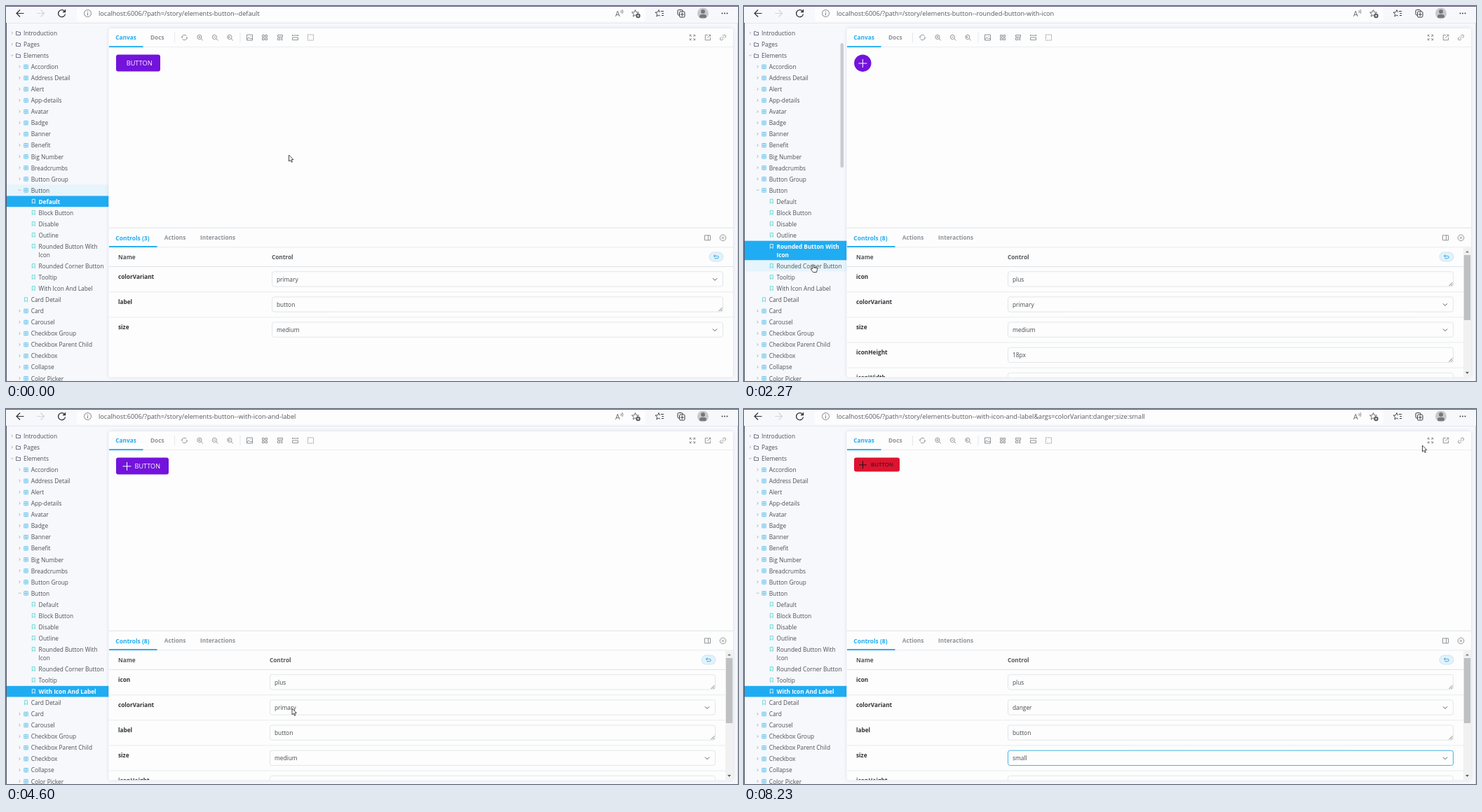
An HTML page with a canvas that plays this animation: 1044 by 536 pixels, repeating every 8.26 s.

```html
<!DOCTYPE html>
<html lang="en">
<head>
<meta charset="utf-8">
<title>Component explorer</title>
<style>
html, body { margin: 0; width: 100%; height: 100%; overflow: hidden; background: #f6f8fc; }
canvas { display: block; }
</style>
</head>
<body>
<canvas id="stage" width="1044" height="536"></canvas>
<script>
const g = document.getElementById('stage').getContext('2d');
const LOOP = 8260, BLUE = '#20acf2', PURPLE = '#7313dc', GREY = '#8f9398', INK = '#45484c';

// ---- drawing helpers ----
function text(s, x, y, color = INK, size = 8.33, weight = 400, align = 'left') {
  g.font = `${weight} ${size}px "Open Sans", "Noto Sans", sans-serif`;
  g.fillStyle = color;
  g.textAlign = align;
  g.fillText(s, x, y + size * 0.36);
}
const bold = (s, x, y, color = '#303336', size = 8.25) => text(s, x, y, color, size, 700);

function rect(x, y, w, h, fill) {
  g.fillStyle = fill;
  g.fillRect(x, y, w, h);
}

function box(x, y, w, h, r, fill, stroke, line = 1) {
  g.beginPath();
  g.roundRect(x, y, w, h, r);
  if (fill) { g.fillStyle = fill; g.fill(); }
  if (stroke) { g.strokeStyle = stroke; g.lineWidth = line; g.stroke(); }
}

const disc = (x, y, r, fill, stroke, line) => box(x - r, y - r, 2 * r, 2 * r, r, fill, stroke, line);

// Strokes (or fills) a path given around its own centre.
function icon(x, y, d, color, line = 0.9, fill) {
  g.save();
  g.translate(x, y);
  const p = new Path2D(d);
  if (fill) { g.fillStyle = fill; g.fill(p); }
  g.strokeStyle = color;
  g.lineWidth = line;
  g.stroke(p);
  g.restore();
}

const I = {
  back: 'M5.5 0H-5M0 -5L-5 0L0 5',
  forward: 'M-5.5 0H5M0 -5L5 0L0 5',
  reload: 'M4.6 -2A5 5 0 1 0 5 1M5 -5.5V-2H1.5',
  star: 'M0 -5L1.4 -1.7L5 -1.4L2.3 .9L3.1 4.4L0 2.5L-3.1 4.4L-2.3 .9L-5 -1.4L-1.4 -1.7Z',
  lines: 'M2 -3H6M3.5 0H6M3 3H6',
  plus: 'M-2.5 0H2.5M0 -2.5V2.5',
  arrow: 'M-1 -1.6L.8 0L-1 1.6',
  open: 'M-1.6 -.8L0 .9L1.6 -.8',
  folder: 'M-3 -2.5H-.6L.2 -1.5H3V2.5H-3Z',
  grid: 'M-2.7 -2.7H2.7V2.7H-2.7ZM0 -2.7V2.7M-2.7 0H2.7',
  mark: 'M-2 -3H2V3L0 1.3L-2 3Z',
  sync: 'M-3.6 -.6A3.7 3.7 0 0 1 3 -2.2M3.6 .6A3.7 3.7 0 0 1 -3 2.2M-4.6 -1.2L-3.6 .4L-2.2 -.8M4.6 1.2L3.6 -.4L2.2 .8',
  lens: 'M2.5 -.6A3.1 3.1 0 1 1 -3.7 -.6A3.1 3.1 0 1 1 2.5 -.6M1.6 1.7L4.3 4.3',
  image: 'M-4 -4H4V4H-4ZM-4 3L-1.5 0L1 2L2.2 .8L4 3M1 -1.5H2',
  cells: 'M-3.5 -3.5H-.8V-.8H-3.5ZM.8 -3.5H3.5V-.8H.8ZM-3.5 .8H-.8V3.5H-3.5ZM.8 .8H3.5V3.5H.8Z',
  panes: 'M-3.5 -3.5H3.5V-1H-3.5ZM-3.5 .7H-.3V3.5H-3.5ZM1.2 .7H3.5M1.2 2H3.5M1.2 3.5H3.5',
  ruler: 'M-4 -3H4M-4 -4V-2M4 -4V-2M-4 0H4V3.5H-4Z',
  frame: 'M-4 -4H4V4H-4Z',
  expand: 'M-1 -1L-3.7 -3.7M1 -1L3.7 -3.7M-1 1L-3.7 3.7M1 1L3.7 3.7M-3.7 -1.3V-3.7H-1.3M1.3 -3.7H3.7V-1.3M-3.7 1.3V3.7H-1.3M1.3 3.7H3.7V1.3',
  leave: 'M0 -3.5H-3.7V3.7H3.5V0M-.8 .8L3.8 -3.8M1.2 -3.8H3.8V-1.2',
  link: 'M-.6 -2L1 -3.5A2 2 0 0 1 3.8 -.8L2.2 .8M.6 2L-1 3.5A2 2 0 0 1 -3.8 .8L-2.2 -.8M-1.5 1.5L1.5 -1.5',
  side: 'M-4 -3.5H4V3.5H-4ZM1 -3.5V3.5',
  cross: 'M-1.7 -1.7L1.7 1.7M1.7 -1.7L-1.7 1.7',
  undo: 'M-3.5 -1H1.5A1.7 1.7 0 0 1 1.5 2.5H-2.5M-1.6 -3L-3.6 -1L-1.6 1',
  chevron: 'M-3 -1.5L0 1.5L3 -1.5',
  grip: 'M-2.5 2.5L2.5 -2.5M.3 2.5L2.5 .3',
  pointer: 'M0 0V9L2.1 7.2L3.6 10.4L5 9.7L3.6 6.7L6.3 6.5Z',
  hand: 'M-1 1Q0 -.6 1 1V4.2L5 5Q6.5 5.4 6 7.5L5 11.5H0L-3.2 7.3Q-3.4 5.6 -1 7Z'
};

// ---- sidebar ----
const tree = [];
let rowY = 39;
function addRows(kind, names) {
  for (const name of names.split(',')) {
    const lines = name.split('|'), h = lines.length > 1 ? 28.1 : 16.05;
    tree.push({ kind, lines, y: rowY, h });
    rowY += h;
  }
}
addRows('folder', 'Introduction,Pages,Elements');
addRows('grid', 'Accordion,Address Detail,Alert,App-details,Avatar,Badge,Banner,Benefit,Big Number,Breadcrumbs,Button Group,Button');
addRows('story', 'Default,Block Button,Disable,Outline,Rounded Button With|Icon,Rounded Corner Button,Tooltip,With Icon And Label');
addRows('mark', 'Card Detail');
addRows('grid', 'Card,Carousel,Checkbox Group,Checkbox Parent Child,Checkbox,Collapse,Color Picker');
const FIRST = 15;

function sidebar(selected, cur) {
  const inside = cur.x < 146;
  tree.forEach((row, i) => {
    const { kind, lines, y, h } = row, on = i === FIRST + selected;
    const top = y - 8.3;
    const hover = inside ? cur.y >= top && cur.y < top + h + 0.4 && cur.y - top > 0.8
                         : lines[0] === 'Button' && selected === 0;
    if (on) rect(1, top, 145.5, h - 0.4, BLUE);
    else if (hover) rect(1, top, 145.5, h - 0.4, '#e6f4fc');
    const expanded = lines[0] === 'Elements' || lines[0] === 'Button';
    const indent = { folder: 25, grid: 35.7, mark: 35.7, story: 46.5 }[kind];
    if (kind === 'folder') icon(17.5, y, I.folder, '#50506c', 0.8);
    else if (kind === 'grid') icon(28.5, y - 0.3, I.grid, '#4dbbe8', 0.8);
    else icon(indent - 7.2, y - 0.5, I.mark, on ? '#fff' : '#48d5cf', 0.8);
    if (kind === 'folder' || kind === 'grid')
      icon(indent - 16.2, y - 0.5, expanded ? I.open : I.arrow, '#9a9fa5', 0.8);
    lines.forEach((s, k) => text(s, indent, y + k * 12.1, on ? '#fff' : '#4c5054', on ? 8.25 : 8.33, on ? 700 : 400));
  });
  if (inside) box(137.5, 53, 4.5, 178, 2.2, '#c9cbd0');
}

// ---- stories: url slug, number of controls, "kind name value" rows ----
const common = ['s colorVariant primary', 't label button', 's size medium'];
const stories = [
  { slug: 'default', count: 3, rows: common },
  { slug: 'block-button', count: 4, rows: ['s colorVariant primary', 's size medium', 'b block true', 't label Block'] },
  { slug: 'disable', count: 4, rows: [...common, 'b disabled true'] },
  { slug: 'outline', count: 4, rows: [...common, 'b outline true'] },
  { slug: 'rounded-button-with-icon', count: 8, thumb: 93,
    rows: ['t icon plus', 's colorVariant primary', 's size medium', 't iconHeight 18px', 't iconWidth 18px'] },
  { slug: 'rounded-corner-button', count: 4, rows: [...common, 'b rounded true'] },
  { slug: 'tooltip', count: 5, thumb: 118, rows: [...common, 'r tooltipPlacement right'] },
  { slug: 'with-icon-and-label', count: 8, thumb: 93, rows: ['t icon plus', ...common, 't iconHeight 18px'] }
];

const steps = [
  [0, 0], [720, 1], [1130, 2], [1530, 3], [1930, 4], [2400, 5], [2950, 6], [3630, 7],
  [5100, 7, { colorVariant: 'success' }],
  [6200, 7, { colorVariant: 'danger' }],
  [6900, 7, { colorVariant: 'danger', size: 'large' }],
  [7550, 7, { colorVariant: 'danger', size: 'small' }]
];
function stateAt(t) {
  const [, id, args = {}] = steps.filter(s => s[0] <= Math.max(t, 0)).pop();
  return { id, args, story: stories[id] };
}

// ---- browser bar ----
function browserBar({ story, args }) {
  rect(0, 0, 1044, 24, '#f7f8fc');
  box(101, -4, 811, 26, 4, '#fdfdfe');
  rect(0, 24, 1044, 1, '#e6e8ee');
  icon(20, 10.5, I.back, '#303036', 1.2);
  icon(49.5, 10.5, I.forward, '#d3d5da', 1.2);
  icon(79.5, 10.5, I.reload, '#303036', 1.3);
  disc(116.5, 10.5, 5, null, '#75777c', 0.9);
  rect(116, 9.8, 1, 3.6, '#75777c');
  rect(116, 7.7, 1, 1.1, '#75777c');
  const list = Object.entries(args).map(e => e.join(':')).join(';');
  text(`localhost:6006/?path=/story/elements-button--${story.slug}${list && '&args=' + list}`, 132, 10.5, '#55585d', 9.19);
  text('A', 869, 11, '#66696e', 10.5);
  icon(877, 8, 'M0 -2Q1.2 0 0 2M2 -3Q3.8 0 2 3', '#66696e', 0.8);
  icon(897.5, 10.5, I.star, '#55585d');
  disc(901.5, 14, 3.2, '#55585d');
  icon(901.5, 14, 'M-1.7 0H1.7M0 -1.7V1.7', '#fff', 0.8);
  icon(931, 10.5, I.star, '#34363a');
  rect(933, 7, 5, 8, '#f7f8fc');
  icon(932, 10.5, I.lines, '#34363a', 1);
  box(958, 5.5, 7, 7.5, 1.5, null, '#34363a');
  box(960.5, 8, 7.5, 8, 1.5, '#f7f8fc', '#34363a');
  icon(964.3, 12, I.plus, '#34363a');
  disc(994, 10.5, 8, '#c9c9cb');
  disc(994, 8, 3, '#77787b');
  box(989, 12, 10, 5, [4, 4, 2, 2], '#77787b');
  for (const x of [1021.5, 1025, 1028.5]) disc(x, 10.5, 0.9, '#34363a');
}

// ---- main area ----
function toolbar() {
  g.save();
  g.shadowColor = 'rgba(30,50,90,.13)';
  g.shadowBlur = 5;
  box(146.5, 32, 890.5, 498.5, 3, '#fdfdfd');
  g.restore();
  rect(147, 58, 890, 1, '#e8ecef');
  bold('Canvas', 156.3, 45, BLUE);
  bold('Docs', 206, 45, GREY);
  rect(147, 57.2, 48.5, 1.9, BLUE);
  rect(240, 38, 1, 14, '#e4e7ea');
  rect(333.5, 38, 1, 14, '#e4e7ea');
  const names = ['sync', 'lens', 'lens', 'lens', 'image', 'cells', 'panes', 'ruler', 'frame'];
  const xs = [254.5, 276.5, 298, 319.5, 347.5, 369, 391, 412.5, 434.5];
  names.forEach((n, i) => {
    g.setLineDash(n === 'frame' ? [1.6, 1] : []);
    icon(xs[i], 45, I[n], '#85898e');
  });
  g.setLineDash([]);
  icon(275.9, 44.4, 'M-1.5 0H1.5M0 -1.5V1.5', '#85898e', 0.8);
  icon(297.4, 44.4, 'M-1.5 0H1.5', '#85898e', 0.8);
  icon(318.5, 44.4, 'M-1.5 0H1.5M-.3 -1.2L-1.5 0L-.3 1.2', '#85898e', 0.8);
  icon(979, 45, I.expand, '#85898e');
  icon(1001, 45, I.leave, '#85898e');
  icon(1022.5, 45, I.link, '#85898e');
}

const plus = (x, y, r, color) => icon(x, y, `M${-r} 0H${r}M0 ${-r}V${r}`, color, 1);

function preview({ id, args }) {
  const x = 157, y = 69.5;
  const plain = (bx, by, fill, r = 3) => {
    box(bx, by, 63, 24, r, fill);
    text('BUTTON', bx + 14.7, by + 12, '#fff', 9.2);
  };
  if (id === 0) plain(x, y, PURPLE);
  if (id === 1) {
    box(x, y, 870, 24, 3, PURPLE);
    text('BLOCK', x + 435, y + 12, '#fff', 9.2, 400, 'center');
  }
  if (id === 2) plain(x, y, '#b98aee');
  if (id === 3) {
    box(x + 0.5, y + 0.5, 62, 23, 3, null, PURPLE);
    text('BUTTON', x + 14.7, y + 12, PURPLE, 9.2);
  }
  if (id === 4) {
    disc(169.3, 81.7, 12.2, PURPLE);
    plus(169.3, 82, 6, '#fff');
  }
  if (id === 5) plain(x, y, PURPLE, 12);
  if (id === 6) plain(558, 102.3, PURPLE);
  if (id === 7) {
    const fill = { success: '#35fa5e', danger: '#dd142f' }[args.colorVariant] || PURPLE;
    const ink = args.colorVariant ? '#16181a' : '#fff';
    const [w, h, px, tx, size, r] = {
      large: [89.5, 30, 18, 29.7, 11.2, 6], small: [65, 20, 12.5, 24, 8, 5.5]
    }[args.size] || [75, 24, 15.5, 26.5, 9.1, 6];
    box(x, y, w, h, 3, fill);
    plus(x + px, y + h / 2 + 0.4, r, ink);
    text('BUTTON', x + tx, y + h / 2, ink, size);
  }
}

function control(kind, value, x, w, top, focused) {
  if (kind === 'b') {
    box(x, top + 7, 73, 18.5, 9.2, '#d7d8da');
    box(x + 35.5, top + 7.3, 37, 17.8, 8.9, '#fdfdfd', '#cfd2d6', 0.8);
    text('False', x + 10.5, top + 16.5, '#75787c', 8, 600);
    bold('True', x + 45.5, top + 16.5, '#303336', 8);
  } else if (kind === 'r') {
    ['top', 'bottom', 'right'].forEach((s, i) => {
      const y = top + 13 + i * 18.8;
      disc(x + 4.5, y, 4, '#fff', '#74777b', 0.9);
      if (s === value) disc(x + 4.5, y, 2.2, '#5a5d61');
      text(s, x + 13, y + 1);
    });
  } else {
    box(x + 0.5, top + 7.2, w - 1, 21.3, 3, '#fdfdfd', focused ? '#43b3e6' : '#e2e5e8');
    text(value, x + 7, top + 18.4);
    if (kind === 's') icon(x + w - 12, top + 18.2, I.chevron, '#55585c', 1);
    else icon(x + w - 4, top + 25, I.grip, '#55585c', 0.8);
  }
}

function panel({ story, args }) {
  const scroll = !!story.thumb, x = scroll ? 376 : 379, w = scroll ? 636 : 644;
  const right = scroll ? 1026 : 1037;
  rect(147, 316.5, 890, 1.2, '#e3e7eb');
  bold(`Controls (${story.count})`, 156.3, 331.5, BLUE, 8.45);
  bold('Actions', 225.7, 331.5, GREY);
  bold('Interactions', 277, 331.5, GREY);
  rect(147, 344.3, 890, 1, '#e8ecef');
  rect(147, 343, 68.5, 1.9, BLUE);
  icon(1000.5, 331.3, I.side, '#85898e');
  disc(1022.5, 331.3, 4.3, null, '#85898e', 0.9);
  icon(1022.5, 331.3, I.cross, '#85898e');

  g.save();
  g.beginPath();
  g.rect(147, 345.3, 890, 185);
  g.clip();
  bold('Name', 160, 359, '#55595d');
  bold('Control', x, 359, '#55595d');
  box(x + w - 20, 352, 20, 13, 6.5, '#e3f2fb', '#c6dfee', 0.8);
  icon(x + w - 10, 358.3, I.undo, '#3ba8dc', 1);
  rect(147, 372, right - 147, 1, '#dfe3e7');
  const focus = Object.keys(args).pop();
  let top = 372.5;
  story.rows.forEach((row, i) => {
    const [kind, name, value] = row.split(' ');
    if (i) rect(147, top - 0.5, right - 147, 1, '#e9ecef');
    bold(name, 160, top + 14.2);
    control(kind, args[name] || value, x, w, top, name === focus);
    top += kind === 'b' ? 38.5 : 36.15;
  });
  if (scroll) {
    rect(1026, 345.3, 11, 185, '#f1f1f2');
    rect(1026.8, 356, 9.4, story.thumb, '#bfc0c2');
    icon(1031.5, 351.3, 'M-2 1L0 -1.2L2 1Z', '#75777a', 0.4, '#75777a');
    icon(1031.5, 524.3, 'M-2 -1L0 1.2L2 -1Z', '#45474a', 0.4, '#45474a');
  }
  g.restore();
}

// ---- mouse ----
const path = [
  [0, 403.5, 213], [200, 403.5, 213], [620, 113, 294], [740, 113, 297], [830, 115.5, 317],
  [1130, 112, 314], [1530, 108, 330], [1930, 104, 348], [2270, 98.5, 369], [2400, 97, 371],
  [2950, 88, 388], [3500, 78, 404], [3670, 71.5, 412], [3900, 76, 410], [4500, 408, 428],
  [5670, 409, 429], [6200, 410, 431], [6800, 438, 500], [7170, 439.5, 501], [7650, 439.5, 501],
  [8200, 967.5, 52], [LOOP, 967.5, 52]
];
function mouseAt(t) {
  const i = path.findIndex(p => p[0] > t), a = path[i - 1], b = path[i];
  const k = (t - a[0]) / (b[0] - a[0]), e = k * k * (3 - 2 * k);
  return { x: a[1] + (b[1] - a[1]) * e, y: a[2] + (b[2] - a[2]) * e };
}

function draw(t) {
  const cur = mouseAt(t), shown = stateAt(t - 60);
  rect(0, 0, 1044, 536, '#f6f8fc');
  browserBar(stateAt(t));
  sidebar(shown.id, cur);
  toolbar();
  preview(stateAt(t - 130));
  panel(shown);
  rect(0, 0, 1044, 0.8, '#3b3763');
  rect(0, 24, 0.9, 512, '#46465c');
  rect(1043.2, 24, 0.8, 512, '#c5c8d2');
  const hand = cur.x < 146 && t < 3600;
  icon(cur.x, cur.y, hand ? I.hand : I.pointer, '#33353a', 0.9, '#fff');
  if (hand) icon(cur.x, cur.y, 'M1 4.2V6M2.6 4.6V6.2M4.3 4.9V6.4', '#33353a', 0.7);
}

const start = performance.now();
(function tick() {
  draw((performance.now() - start) % LOOP);
  requestAnimationFrame(tick);
})();
</script>
</body>
</html>
```
